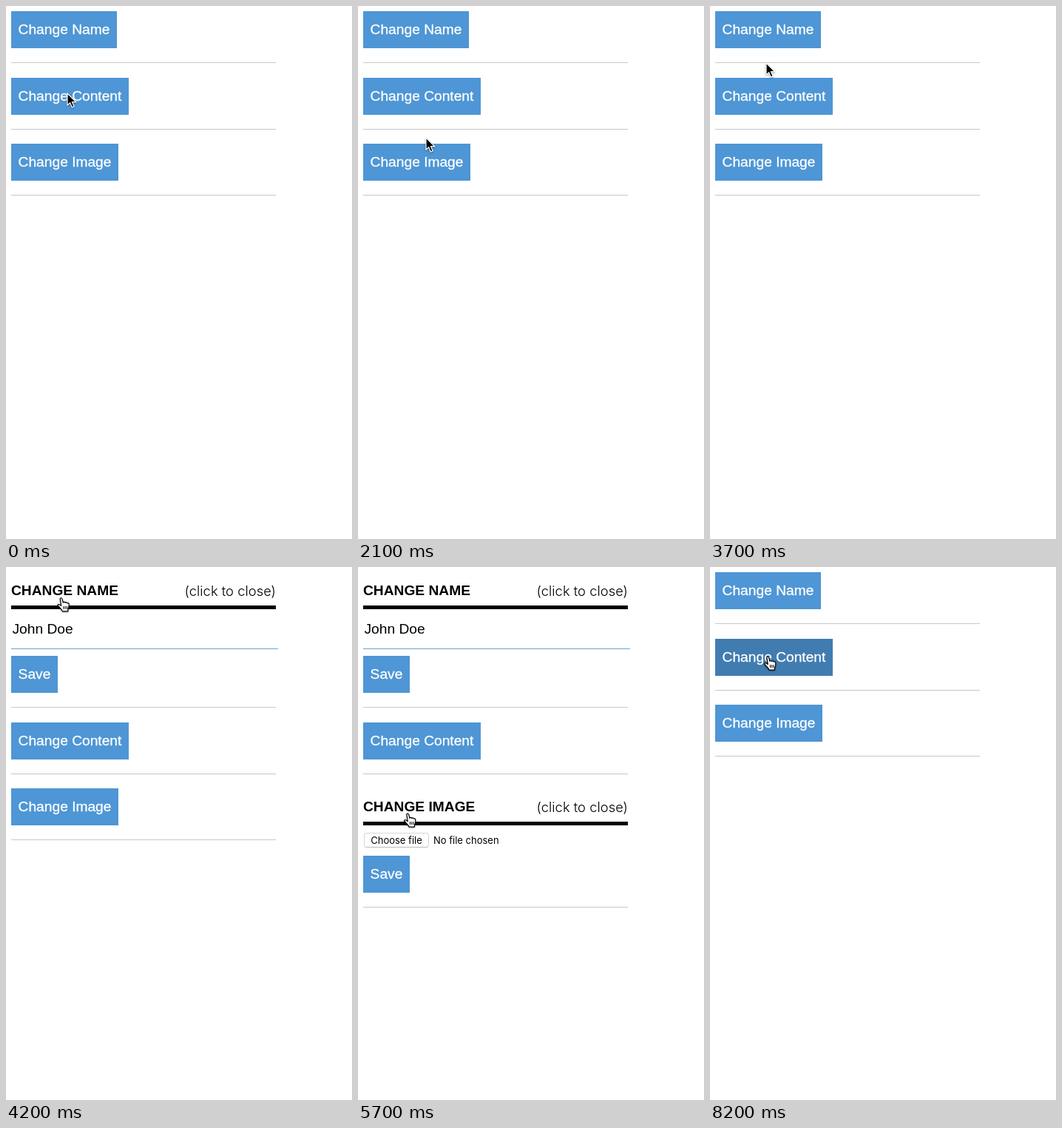
An HTML page for the animation above (8.3 s loop, 468 px wide and 720 px high).

```html
<!DOCTYPE html>
<html lang="en">
<head>
<meta charset="utf-8">
<title>Expanding form sections</title>
<style>
  html, body { margin: 0; width: 100%; height: 100%; overflow: hidden; background: #fff; }
  body { position: relative; font: 19.2px/50px "Liberation Sans", Arial, sans-serif; color: #000; }
  main { position: absolute; left: 7px; top: 7px; width: 358px; }
  section { position: relative; height: 89.5px; white-space: nowrap; }
  section::after { content: ""; position: absolute; left: 0; right: 0; bottom: 19.5px; height: 1px; background: #c8c8c8; }
  section > * { position: absolute; box-sizing: border-box; }
  section.open { height: calc(89.5px + var(--extra)); }
  section.open > .toggle, section:not(.open) > :not(.toggle) { display: none; }

  .button { left: 0; height: 50px; padding: 0 9.6px; background: #4e96d5; color: #fff; -webkit-text-stroke: .3px #fff; }
  .button.hover { background: #417cb1; }
  .save { bottom: 39.5px; }

  .head { top: 0; width: 358px; height: 50px; font-weight: bold; }
  .head::after { content: ""; position: absolute; left: 0; top: 45px; width: 100%; height: 5px; background: #000; }
  .head span { position: absolute; right: 0; font: 300 18.4px/50px Inter, "Liberation Sans", sans-serif; }

  .input { top: 57px; width: 361px; height: 47px; padding: 7.5px 1.5px; line-height: 24px; border-bottom: 1px solid #6ba2d0; }
  .area { top: 59.5px; width: 358px; height: 357.5px; padding: 4.5px 6px; line-height: 24px; border: 1px solid #999; }
  .area svg { position: absolute; right: 1px; bottom: 1px; }
  .file { top: 60px; left: 1px; font: 13px/20px Inter, "Liberation Sans", sans-serif; }
  .file b { display: inline-block; box-sizing: border-box; width: 88px; height: 20px; margin-right: 6px; text-align: center;
    font-weight: 400; line-height: 19px; border: 1px solid #d6d6d6; border-bottom-color: #bbb; border-radius: 4px; }

  #cursor { position: absolute; left: 0; top: 0; overflow: visible; pointer-events: none; }
</style>
</head>
<body>
<main>
  <section id="name" style="--extra:113.3px">
    <div class="button toggle">Change Name</div>
    <div class="head">CHANGE NAME<span>(click to close)</span></div>
    <div class="input">John Doe</div>
    <div class="button save">Save</div>
  </section>
  <section id="content" style="--extra:432px">
    <div class="button toggle">Change Content</div>
    <div class="head">CHANGE CONTENT<span>(click to close)</span></div>
    <div class="area">lorem ipsum dolum ipa
      <svg width="10" height="10" stroke="#666"><path d="M1 9 9 1M5.5 9 9 5.5"/></svg>
    </div>
    <div class="button save">Save</div>
  </section>
  <section id="image" style="--extra:90.7px">
    <div class="button toggle">Change Image</div>
    <div class="head">CHANGE IMAGE<span>(click to close)</span></div>
    <div class="file"><b>Choose file</b>No file chosen</div>
    <div class="button save">Save</div>
  </section>
</main>

<svg id="cursor" width="20" height="22">
  <g id="arrow" style="filter:drop-shadow(0 1px 1px #0006)">
    <path d="M0 0V16L3.7 12.7 6.3 18.9 9.1 17.7 6.5 11.6H11.5Z" stroke="#fff" stroke-width="1.2"/>
  </g>
  <g id="hand" transform="translate(-5.7 -.9)" fill="#fff" stroke="#000" stroke-width="1.2" stroke-linejoin="round"
     style="filter:drop-shadow(0 1px 1px #0005)">
    <path d="M4.6 2.6C4.2.8 6.6.2 7.2 2L8.6 7.2C8.8 5.8 11 6 11.3 7.4 11.8 6.3 13.6 6.7 13.9 8 14.6 7.3 16.4 7.7 16.5 9.4 16.8 12 16.4 13.4 15.2 16V19H7.8C7 16.6 4 14.2 1.6 11.4.6 10 2 9 3.4 9.8L6 11.4Z"/>
    <path d="M9.2 12v4M11.4 12v4M13.6 12v4" stroke-width="1"/>
  </g>
</svg>

<script>
const LOOP = 8300, STEP = 100;

// When each section is open, in ms.
const openSpans = {
  name: [[4000, 7000]],
  content: [[400, 1400], [6500, 7500]],
  image: [[2400, 3100], [5200, 6000]],
};

// Pointer hotspot: time, x, y.
const path = [
  [0, 83, 118], [300, 82, 119], [1700, 82, 122], [2100, 92, 178], [2300, 90, 205],
  [3200, 84, 208], [3700, 76, 77], [3900, 75, 45], [4400, 74, 40], [5000, 43, 337],
  [5300, 67, 333], [6000, 67, 333], [6300, 78, 236], [6500, 80, 235], [6900, 85, 38],
  [7000, 85, 38], [7400, 81, 122], [7700, 78, 121], [LOOP, 78, 121],
];

const byId = id => document.getElementById(id);
const cursor = byId("cursor"), arrow = byId("arrow"), hand = byId("hand");
const buttons = document.querySelectorAll(".button");

function pointerAt(t) {
  const i = path.findIndex(p => p[0] > t);
  const [t0, x0, y0] = path[i - 1], [t1, x1, y1] = path[i];
  const k = (t - t0) / (t1 - t0), e = k * k * (3 - 2 * k);
  return [x0 + (x1 - x0) * e, y0 + (y1 - y0) * e];
}

function render(t) {
  for (const id in openSpans)
    byId(id).classList.toggle("open", openSpans[id].some(([from, to]) => t >= from && t < to));

  const [x, y] = pointerAt(t);
  const under = document.elementFromPoint(x, y);
  const target = t > 0 && under ? under.closest(".button, .head") : null;
  buttons.forEach(b => b.classList.toggle("hover", b === target));
  arrow.style.display = target ? "none" : "";
  hand.style.display = target ? "" : "none";
  cursor.style.transform = `translate(${x}px, ${y}px)`;
}

const start = performance.now();
function tick() {
  const t = (performance.now() - start) % LOOP;
  render(Math.floor(t / STEP) * STEP);
  requestAnimationFrame(tick);
}
tick();
</script>
</body>
</html>
```
